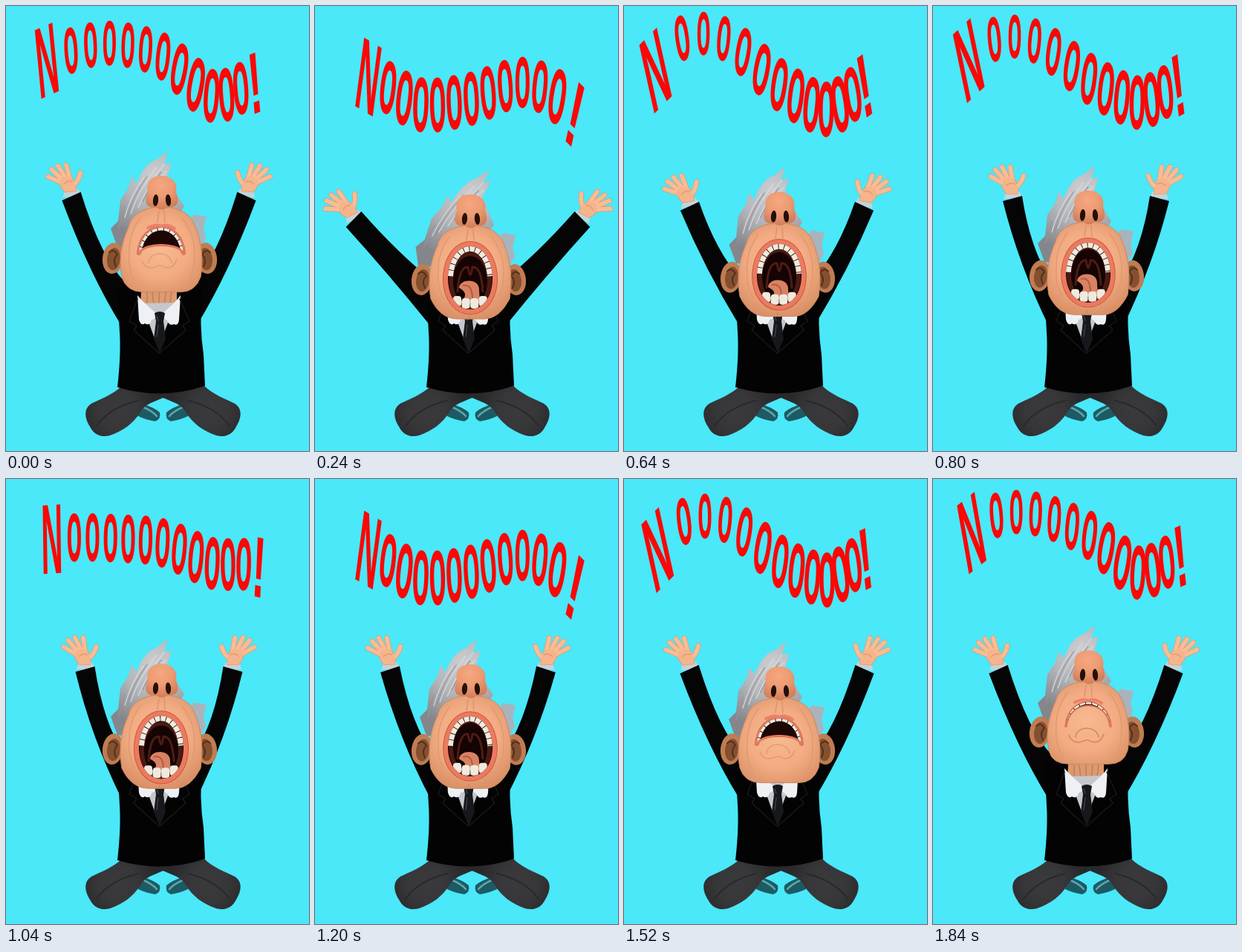
These frames come from a looping animation (408 by 600 pixels, 1.92 s). An HTML page with a canvas:

```html
<!DOCTYPE html>
<html lang="en">
<head>
<meta charset="utf-8">
<title>Nooooooooooo!</title>
<style>
html, body { margin: 0; width: 100%; height: 100%; overflow: hidden; background: #4ae8f8; }
canvas { display: block; }
</style>
</head>
<body>
<canvas id="stage" width="408" height="600"></canvas>
<script>
const ctx = document.getElementById('stage').getContext('2d');
const LOOP = 1920, WAVE = 960, STEP = 80;
const WORD = 'Nooooooooooo!';
const ANCHORS = [0, 1, 3, 6, 9, 11, 12]; // letters whose heights are keyed

// time, left x, bulge, right x, then the height of each anchor letter
const waveKeys = [
  [0, 55, 14, 335, 73, 60, 50, 68, 121, 111, 104],
  [240, 72, -3, 350, 95, 110, 133, 125, 103, 122, 146],
  [480, 50, 16, 338, 95, 82, 88, 125, 125, 115, 117],
  [560, 45, 23, 325, 95, 57, 55, 111, 136, 116, 108],
  [680, 42, 23, 325, 82, 40, 42, 104, 139, 120, 108],
  [800, 48, 19, 330, 73, 45, 47, 98, 130, 116, 107],
  [880, 52, 16, 333, 72, 49, 47, 76, 126, 112, 104]
];
// time, wrist x y, elbow x y, hand turn, head drop, mouth, hair lean, tongue
const poseKeys = [
  [0, 88, 254, 111, 345, -.1, 0, .24, 0, 0],
  [240, 52, 285, 98, 345, -.45, 25, 1, .22, 1],
  [480, 66, 279, 100, 345, -.42, 24, 1, 0, .4],
  [800, 107, 257, 113, 330, 0, 20, .95, 0, 1],
  [1200, 101, 254, 112, 335, -.03, 21, .95, 0, .6],
  [1520, 88, 254, 111, 345, -.1, 24, .24, 0, 0],
  [1680, 88, 254, 111, 345, -.1, 13, .1, 0, 0],
  [1840, 88, 254, 111, 345, -.1, 2, .02, 0, 0]
];

function spline(xs, ys, x) {
  const last = xs.length - 1;
  let i = 0;
  while (i < last - 1 && x >= xs[i + 1]) i++;
  const slope = k => {
    const a = Math.max(0, k - 1), b = Math.min(last, k + 1);
    return (ys[b] - ys[a]) / (xs[b] - xs[a]);
  };
  const h = xs[i + 1] - xs[i], s = (x - xs[i]) / h, r = 1 - s;
  return r * r * (1 + 2 * s) * ys[i] + s * s * (3 - 2 * s) * ys[i + 1]
    + h * s * r * (r * slope(i) - s * slope(i + 1));
}

function sample(keys, period, t) {
  const shift = (key, by) => [key[0] + by, ...key.slice(1)];
  const all = [shift(keys.at(-1), -period), ...keys, shift(keys[0], period), shift(keys[1], period)];
  const times = all.map(k => k[0]);
  return keys[0].slice(1).map((_, i) => spline(times, all.map(k => k[i + 1]), t % period));
}

function fill(path, color) {
  ctx.fillStyle = color;
  ctx.fill(typeof path === 'string' ? new Path2D(path) : path);
}

function line(path, color, width) {
  ctx.strokeStyle = color;
  ctx.lineWidth = width;
  ctx.stroke(typeof path === 'string' ? new Path2D(path) : path);
}

function oval(x, y, rx, ry, color, turn = 0) {
  ctx.fillStyle = color;
  ctx.beginPath();
  ctx.ellipse(x, y, rx, ry, turn, 0, Math.PI * 2);
  ctx.fill();
}

function glow(x, y, r, ...colors) {
  const g = ctx.createRadialGradient(x, y, 0, x, y, r);
  colors.forEach((c, i) => g.addColorStop(i / (colors.length - 1), c));
  return g;
}

// runs a drawing as is and mirrored about the vertical line x = axis
function both(axis, draw) {
  for (const side of [1, -1]) {
    ctx.save();
    if (side < 0) ctx.transform(-1, 0, 0, 1, 2 * axis, 0);
    draw();
    ctx.restore();
  }
}

function hand(x, y, turn) {
  ctx.save();
  ctx.translate(x, y);
  ctx.rotate(turn);
  fill('M-12 3 L-8 -7 Q2 -11 10 -6 L13 3Z', '#c3d3dc');
  const fingers = 'M-11 -17 L-29 -27 M-9 -20 L-23 -36 M-5 -22 L-14 -40 M0 -22 L-3 -40 M3 -12 Q11 -15 15 -28';
  const palm = 'M-8 -4 Q-17 -15 -12 -22 Q-4 -28 3 -22 Q8 -14 7 -4Z';
  line(fingers, '#e39a70', 7);
  line(palm, '#e39a70', 1.5);
  line(fingers, '#f8bd96', 5.5);
  fill(palm, '#f5b48b');
  line('M-8 -15 Q-3 -20 3 -17', '#de976c', 1.2);
  ctx.restore();
}

function arm(wx, wy, ex, ey, turn) {
  hand(wx, wy, turn);
  const len = Math.hypot(wx - ex, wy - ey);
  const nx = -(wy - ey) / len, ny = (wx - ex) / len;
  const at = (x, y, d) => `${x + nx * d} ${y + ny * d}`;
  fill(`M156 432 Q${at(ex, ey + 18, 2)} ${at(wx, wy + 5, -13)} L${at(wx, wy, 13)}
    Q${at(ex, ey, 18)} 160 372Z`, '#050506');
}

function body() {
  both(211.5, () => {
    fill('M176 540 L185 537 Q199 541 207 548 Q209 557 201 560 Q188 558 178 553Z', '#1d5a64');
    line('M185 541 Q197 546 203 553', '#5aa7b0', 2.5);
    fill(`M212 520 L156 512 C146 523 127 530 115 536 C104 543 106 556 113 567 C119 579 129 582 140 579
      C158 573 172 562 180 549 Q186 538 198 534 L212 528Z`, glow(150, 545, 52, '#3a3a3d', '#37373a', '#29292c'));
    line('M122 566 Q140 541 178 532', '#29292b', 2);
  });
  fill('M150 384 L160 374 H254 L264 384 Q260 430 266 470 L268 512 Q210 532 150 514 Q155 470 153 440Z', '#030304');
  fill('M183 370 H230 V402 Q206 424 181 402Z', '#dc9a72');
  line('M190 386 V400 M197 386 L199 404 M206 386 V406 M215 386 L213 404 M223 386 L221 400', '#bf7e58', 1.5);
  fill('M183 401 L205 462 L228 400Z', '#c4c8cd');
  fill(`M177 390 Q184 399 203 415 Q201 423 196 423 Q194 432 187 428 Q182 432 179 423Z
    M235 390 Q228 400 210 415 Q212 423 217 424 Q220 432 226 429 Q232 432 233 423Z`, '#eef1f4');
  fill('M200 414 Q207 410 214 414 L212 425 L215 449 L207 468 L199 449 L202 425Z', '#17181c');
  line('M203 418 L205 424 M205 430 L203 446', '#3d3f45', 1.5);
  line('M177 395 L166 425 L176 431 L172 437 L206 468 M234 395 L247 425 L238 431 L242 437 L207 468', '#19191b', 1.4);
}

function hair(lean) {
  ctx.save();
  ctx.transform(1, 0, -lean, 1, 275 * lean, 0);
  fill(`M150 325 L141 300 L151 290 L154 262 L165 245 L169 230 L176 240 Q185 213 203 207
    L218 195 L213 213 L223 211 L216 233 L240 270 L200 330Z`, glow(200, 228, 85, '#cdced1', '#b4b5b9', '#84868b'));
  line(`M160 285 Q168 255 185 232 M168 280 Q178 250 202 218 M178 272 Q190 244 213 213
    M190 260 Q198 240 216 223`, '#d9dadd', 1.2);
  line('M164 283 Q172 254 190 230 M184 264 Q196 238 209 224 M152 300 L160 270', '#92959b', 1.2);
  ctx.restore();
  fill('M245 290 L253 281 L270 284 L266 300 L269 313 L262 325Z', '#a9b3bc');
}

function ear() {
  oval(144, 339, 14, 21, '#c07c52', .12);
  oval(145, 340, 9, 15, '#85502f', .12);
  line('M139 331 Q145 325 150 334 Q143 340 148 350', '#54301d', 2);
}

function mouth(open, tongue) {
  const cx = 209, w = 30;
  const corner = 331 + 8 * open, mid = 301 + 83 * open;
  const curve = (y, dx, to) => {
    const cy = (4 * y - corner) / 3;
    return `C${cx - to * dx} ${cy} ${cx + to * dx} ${cy} ${cx + to * w} ${corner}`;
  };
  const upper = `M${cx - w} ${corner} ` + curve(299, 26, 1);
  const gap = new Path2D(upper + curve(mid, 26 + 6 * open, -1) + 'Z');

  line(gap, '#c75a40', 3 + 11 * open);
  line(gap, '#ec7a5e', 2 + 10 * open);
  if (open < .5) line('M191 299 Q203 293 209 297 Q216 293 227 300', '#e98268', 4);
  fill(gap, '#1d0705');

  ctx.save();
  ctx.clip(gap);
  if (open > .4) {
    oval(cx, mid - 38, 29, 39, '#4a1b14');
    oval(cx, mid - 38, 23, 34, '#150403');
    line(`M${cx - 17} ${mid - 24} Q${cx - 15} ${mid - 58} ${cx - 3} ${mid - 57} Q${cx} ${mid - 36} ${cx + 3} ${mid - 57}
      Q${cx + 15} ${mid - 58} ${cx + 17} ${mid - 24}`, '#4d1c14', 3);
    const tip = mid - 22 - 14 * tongue;
    fill(`M${cx - 17} ${mid - 8} C${cx - 6} ${mid - 14} ${cx - 2} ${tip + 14} ${cx - 15} ${tip + 7}
      C${cx - 14} ${tip - 6} ${cx + 13} ${tip - 6} ${cx + 12} ${tip + 10} L${cx + 13} ${mid - 8}Z`, '#d98263');
    line(`M${cx - 9} ${tip + 4} Q${cx + 4} ${tip + 1} ${cx + 3} ${mid - 9}`, '#b15a42', 2);
    for (let i = 0; i < 4; i++) {
      ctx.fillStyle = '#f0eade';
      ctx.beginPath();
      ctx.roundRect(cx - 23 + i * 11.6, mid - 16 + (i % 3 ? 1 : -2), 11, 14, 4);
      ctx.fill();
    }
  }
  ctx.lineCap = 'butt';
  ctx.setLineDash([8, 1]);
  line(upper, '#f0eade', 5 + 9 * open);
  ctx.restore();
}

function head(drop, open, lean, tongue) {
  ctx.save();
  ctx.translate(0, drop);
  hair(lean);
  both(207, () => {
    ctx.translate(0, 5 * open);
    ear();
  });
  const chin = 382 + 15 * open, inset = 9 * open, jaw = 364 + 6 * open;
  const face = new Path2D(`M165 298 C169 279 188 271 209 271 C232 271 249 279 255 298 C264 320 266 345 262 ${jaw}
    Q${257 - inset} ${chin} ${237 - inset} ${chin} L${183 + inset} ${chin} Q${160 + inset} ${chin} 156 ${jaw}
    C151 340 156 318 165 298Z`);
  fill(face, glow(207, 325, 78, '#f8b991', '#f3ac83', '#d68c63'));
  line(face, '#cc8860', 1);
  line('M181 286 Q166 306 166 330 Q164 356 174 371 M237 286 Q253 306 254 330 Q255 356 246 371', '#df9a71', 1.5);
  if (open < .5) {
    ctx.globalAlpha = 1 - 2 * open;
    line('M183 344 Q188 356 201 352 Q207 348 213 352 Q225 356 230 342 M192 346 Q193 335 207 334 Q221 335 223 346', '#cf8a62', 1.7);
    ctx.globalAlpha = 1;
  } else {
    line(`M207 ${chin - 5} V${chin}`, '#cf8a62', 1.5);
  }
  mouth(open, tongue);
  line('M206 276 L204 291 M213 276 L214 291', '#d9946c', 1.4);
  const nose = 'M191 251 C188 236 197 229 209 229 C222 229 232 237 229 251 C235 266 229 273 218 271 Q210 278 202 271 C189 274 185 264 191 251Z';
  fill(nose, glow(208, 242, 33, '#f6a880', '#ec9a72', '#cf7c57'));
  both(210, () => oval(201.5, 262, 3.6, 8, '#24100a', .08));
  ctx.restore();
}

function word([left, bulge, right, ...heights]) {
  // the wide capital pushes the small letters along
  const place = i => {
    const u = (i + .2 * Math.min(1, i)) / 12.2;
    return [left + (right - left) * u + bulge * 4 * u * (1 - u), spline(ANCHORS, heights, i)];
  };
  ctx.font = 'bold 100px "Liberation Sans", Arial, sans-serif';
  ctx.fillStyle = '#fd0606';
  [...WORD].forEach((letter, i) => {
    const [x, y] = place(i);
    const [ax, ay] = place(Math.max(0, i - .5)), [bx, by] = place(Math.min(12, i + .5));
    const slope = Math.max(-1, Math.min(1, (by - ay) / (bx - ax)));
    const [w, h] = letter === 'N' ? [24, 94] : letter === '!' ? [8, 80] : [17.5 + .04 * (y - 50), 61 + .16 * (y - 50)];
    const { actualBoundingBoxLeft: l, actualBoundingBoxRight: r, actualBoundingBoxAscent: a, actualBoundingBoxDescent: d } =
      ctx.measureText(letter);
    const sx = w / (l + r), sy = h / (a + d);
    ctx.save();
    ctx.transform(sx, sx * slope, -.22 * slope * sy, sy, x, y);
    ctx.fillText(letter, (l - r) / 2, (a - d) / 2);
    ctx.restore();
  });
}

function draw(now) {
  const t = Math.floor(now % LOOP / STEP) * STEP;
  const [wx, wy, ex, ey, turn, drop, open, lean, tongue] = sample(poseKeys, LOOP, t);
  ctx.lineCap = ctx.lineJoin = 'round';
  ctx.fillStyle = '#4ae8f8';
  ctx.fillRect(0, 0, 408, 600);
  both(206, () => arm(wx, wy, ex, ey, turn));
  body();
  head(drop, Math.max(0, Math.min(1, open)), lean, tongue);
  word(sample(waveKeys, WAVE, t));
}

let start;
function tick(now) {
  start ??= now;
  draw(now - start);
  requestAnimationFrame(tick);
}
requestAnimationFrame(tick);
</script>
</body>
</html>
```
